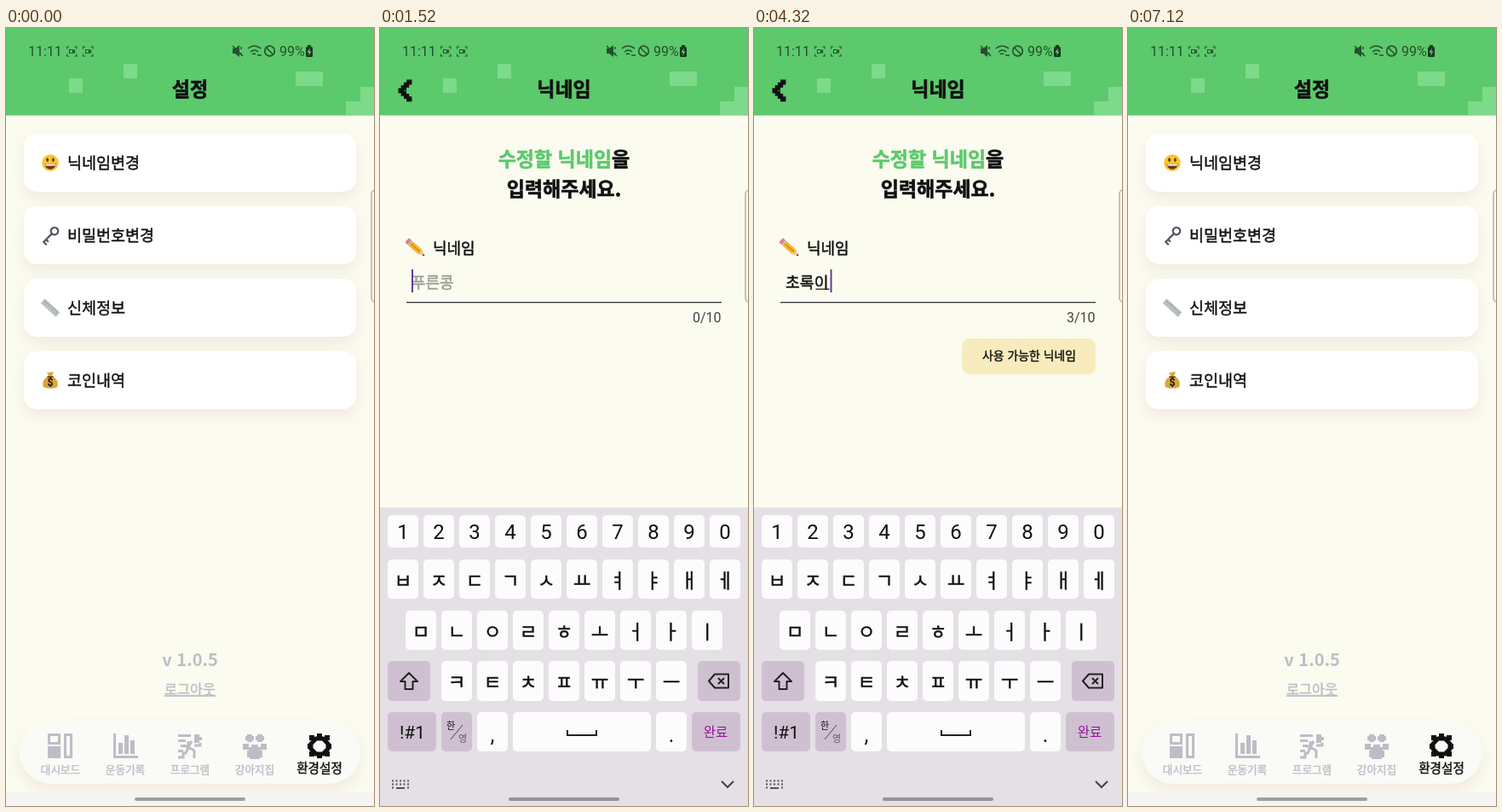
Recreate the animation shown at these times as an HTML page. Size 432 by 912 pixels, loop 7.36 s.

```html
<!DOCTYPE html>
<html lang="ko">
<head>
<meta charset="utf-8">
<style>
html, body { margin: 0; width: 100%; height: 100%; overflow: hidden; background: #fcfbef; }
svg { display: block; width: 432px; height: 912px; }
text { font-family: 'Noto Sans CJK KR', 'Noto Sans CJK', 'Noto Sans KR', sans-serif; color: #111; }
text, tspan { fill: currentColor; }
.latin { font-family: Roboto, sans-serif; }
.mid { text-anchor: middle; }
.end { text-anchor: end; }
.heavy, .heavy tspan { font-weight: 900; stroke: currentColor; stroke-width: .6px; }
.medium { font-weight: 500; stroke: currentColor; stroke-width: .4px; }
.card { filter: drop-shadow(0 8px 8px rgba(110, 70, 80, .09)); }
.raised { filter: drop-shadow(0 2px 2px rgba(0, 0, 0, .3)); }
.floating { filter: drop-shadow(0 1px 3px rgba(0, 0, 0, .28)); }
.line { fill: none; stroke: currentColor; }
</style>
</head>
<body>
<svg id="stage" viewBox="0 0 432 912"></svg>
<script>
const LOOP = 7360;
const INK = '#222', CREAM = '#fcfbef', GREEN = '#5cc96c', MUTED = '#bcbdc7';
const KEY = '#fcfcfc', DARK_KEY = '#cfc0d1';

// SVG building helpers
const rect = (x, y, w, h, fill, r = 0, extra = '') =>
  `<rect x="${x}" y="${y}" width="${w}" height="${h}" rx="${r}" fill="${fill}" ${extra}/>`;
const text = (x, y, size, str, cls = '', style = '') =>
  `<text x="${x}" y="${y}" font-size="${size}" class="${cls}" style="${style}">${str}</text>`;
const path = (d, color, width = 1.5, extra = '') =>
  `<path d="${d}" class="line" style="color:${color}" stroke-width="${width}" ${extra}/>`;
const shape = (d, fill) => `<path d="${d}" fill="${fill}"/>`;
const at = (x, y, content) => `<g transform="translate(${x} ${y})">${content}</g>`;

const header = title =>
  rect(0, 0, 432, 102.5, GREEN) +
  shape('M74 59h16v17h-16zM138 42h16v17h-16zM340 51h32v17h-32zM416 69h16v33h-33v-16h17z', '#7dda8a') +
  text(216, 80, 23, title, 'mid heavy');

// Small pictures, each centred on its own origin
const smiley = `<circle r="9.8" fill="#fbc52d"/><ellipse cx="-3.4" cy="-3.4" rx="1.4" ry="2.3" fill="#5b3a12"/>
  <ellipse cx="3.4" cy="-3.4" rx="1.4" ry="2.3" fill="#5b3a12"/>
  ${shape('M-6.5 1.2h13a6.5 6.5 0 0 1-13 0z', '#6b3813')}${shape('M-5.8 1.5h11.6v2h-11.6z', '#fff')}`;
const oldKey = `<g transform="rotate(-45)"><circle cx="7" r="4.2" class="line" style="color:#555560" stroke-width="2.4"/>
  ${path('M3 0H-12M-11 0v5M-7 0v4', '#555560', 2.2)}</g>`;
const ruler = `<g transform="rotate(42)">${rect(-12, -3.5, 24, 7, '#b9c0c2')}
  ${path('M-9-3v3M-6-3v2M-3-3v3M0-3v2M3-3v3M6-3v2M9-3v3', '#7f888b', .8)}</g>`;
const moneyBag = shape('M-4-9l8-1-2 5c6 3 8 8 6 13q-8 3-16 0c-2-5 0-10 6-13z', '#d9a63c') +
  path('M-3.5-4h7', '#7a5420', 2) + text(0, 6.5, 12, '$', 'latin mid', 'font-weight:700');
const pencil = `<g transform="rotate(42)">${rect(-8, -3.5, 15, 7, '#f5b82e')}${rect(-8, -.8, 15, 1.6, '#d98a1d')}
  ${rect(-11, -3.5, 3, 7, '#b8c0c6')}${rect(-14, -3.5, 4, 7, '#e8798c', 1.5)}
  ${shape('M7-3.5L14 0 7 3.5z', '#ecc79b')}${shape('M11.5-1.3L14 0l-2.5 1.3z', '#333')}</g>`;

const card = ([icon, label], i) => {
  const y = 124 + i * 85;
  return rect(21, y, 390, 68, '#fff', 15, 'class="card"') + at(52, y + 34, icon) +
    text(72, y + 40.5, 18.5, label, 'medium');
};

const tabIcons = [
  path('M50.5 828.5h12v10h-12zM69.5 828.5h7v26h-7z', MUTED, 3) + shape('M49 842h15v14h-15z', MUTED),
  shape('M126 827h3v26h26v3h-29zM132 838h5v13h-5zM139 829h5v22h-5zM146 835h5v16h-5z', MUTED),
  shape('M202 828h15v3h-15zM221 828h6v3h3v4h-3v3h-6zM202 834h9v3h-9zM205 840h6v3h-6zM202 846h6v3h-6z', MUTED) +
    path('M214 836v6h-5M218 836l-4 7 7 4v9M214 843l-3 7h-3v5h-6M221 841h7v-3', MUTED, 3),
  shape('M283 828h6v9h-6zM281 830h10v5h-10zM295 828h6v9h-6zM293 830h10v5h-10zM278 839h7v7h-7zM299 839h7v7h-7zM288 840h8v3h3v4h2v8h-3v2h-12v-2h-3v-8h2v-4h3z', MUTED),
  path('M364 833h8l6 6v6l-6 6h-8l-6-6v-6z', '#111', 5) +
    shape('M365 827h6v5h-6zM365 851h6v5h-6zM354 839h5v6h-5zM377 839h5v6h-5zM356 829h6v6h-6zM374 829h6v6h-6zM356 848h6v6h-6zM374 848h6v6h-6z', '#111'),
];
const tabs = ['대시보드', '운동기록', '프로그램', '강아지집', '환경설정'].map((label, i) =>
  tabIcons[i] + (i < 4
    ? text(64 + i * 76, 873.5, 12.6, label, 'mid medium', `color:${MUTED}`)
    : text(368, 873, 14.6, label, 'mid medium'))).join('');

const settingsPage = rect(0, 0, 432, 912, CREAM) + header('설정') +
  [[smiley, '닉네임변경'], [oldKey, '비밀번호변경'], [ruler, '신체정보'], [moneyBag, '코인내역']].map(card).join('') +
  text(216, 748, 20, 'v 1.0.5', 'mid', `font-weight:700;color:${MUTED}`) +
  text(216, 781, 16.3, '로그아웃', 'mid medium', `color:${MUTED};text-decoration:underline`) +
  rect(16, 812, 400, 74, '#fafaf6', 37, 'class="card"') + tabs;

const backArrow = [0, 1, 2, 3, 4, 5, 6].map(i =>
  rect(21.5 + Math.abs(i - 3) * 3.2, 60.5 + i * 3.3, 6.3, 6, '#111')).join('');

const formPage = rect(0, 0, 432, 912, CREAM) + header('닉네임') + backArrow +
  `<text x="216" y="162" font-size="23" class="mid heavy"><tspan style="color:${GREEN}">수정할 닉네임</tspan>을</text>` +
  text(216, 197, 23, '입력해주세요.', 'mid heavy') +
  at(42, 258, pencil) + text(62, 264.5, 18, '닉네임', 'medium') +
  '<g id="field"></g>' +
  rect(26, 823, 380, 53, '#74c88b', 9, 'class="raised"') +
  '<g id="submitRipple"></g>' + text(216, 855.5, 18.2, '수정 완료', 'mid medium');

// Keyboard geometry
const keyRows = [
  ['1234567890', 9, 571, 38], ['ㅂㅈㄷㄱㅅㅛㅕㅑㅐㅔ', 9, 623, 46],
  ['ㅁㄴㅇㄹㅎㅗㅓㅏㅣ', 30, 683, 46], ['ㅋㅌㅊㅍㅠㅜㅡ', 72, 742, 47],
];
const keyAt = {};
const plainKeys = keyRows.map(([chars, x0, y, h], row) => [...chars].map((char, i) => {
  const x = x0 + i * 42;
  keyAt[char] = { x: x + 18, y };
  return rect(x, y, 36, h, KEY, 5) +
    (row ? text(x + 18, y + h / 2 + 9.5, 22.5, char, 'mid medium') : text(x + 18, y + 28, 24, char, 'latin mid'));
}).join('')).join('');

const keyboard = rect(0, 562, 432, 350, '#e5dfe6') + plainKeys +
  rect(9, 742, 50, 47, DARK_KEY, 5) + rect(373, 742, 50, 47, DARK_KEY, 5) +
  path('M34 756l10 10h-5.5v9h-9v-9h-5.5z', INK, 2, 'stroke-linejoin="round"') +
  path('M386 765.5l7-8h16v16h-16zM397 762l7 7M404 762l-7 7', INK, 2, 'stroke-linejoin="round"') +
  [[9, 57, DARK_KEY], [72, 36, DARK_KEY], [114, 36, KEY], [156, 162, KEY], [324, 36, KEY], [366, 57, DARK_KEY]]
    .map(([x, w, fill]) => rect(x, 802, w, 46, fill, 5)).join('') +
  text(38, 833, 21, '!#1', 'latin mid') + text(83, 822, 11, '한', 'mid') +
  text(97, 837, 11, '영', 'mid', 'opacity:.6') + path('M83 834l14-17', '#444', 1) +
  text(132, 837, 25, ',', 'latin mid') + text(342, 837, 25, '.', 'latin mid') +
  path('M220 823v6h34v-6', INK, 2) +
  text(394, 831, 15.5, '완료', 'mid', 'color:#94149a');

const keyboardTools = path('M14 882.5h20M14 886.5h20M14 890.5h2M32 890.5h2', '#555', 2, 'stroke-dasharray="2 2.5"') +
  path('M19 891h10', '#555', 2) + path('M401 883l7 7 7-7', '#444', 2);

const STATUS = '#24512e';
const screenshotIcon = x => at(x, 21.5,
  path('M.5 3V.5H3M9.500.5H12V3M12 9v2.500H9.500M3 11.500H.5V9M3.500 4h4v4h-4zM7.500 6l2-1.500v3z', STATUS, 1.1));
const statusBar = text(26, 32.5, 16, '11:11', 'latin', `color:${STATUS}`) +
  screenshotIcon(71) + screenshotIcon(90) +
  shape('M266 24h3l5-4v14l-5-4h-3z', STATUS) + path('M266 21l12 12M276 22v3M276 29v2', STATUS, 1.5) +
  path('M284 24q7-6 15 0M287 28q5-4 9 0M289 31q2-2 4 0M295 32h5', STATUS, 1.6) +
  `<circle cx="309.5" cy="27" r="5.8" class="line" style="color:${STATUS}" stroke-width="1.7"/>` +
  path('M305.5 23l8 8', STATUS, 1.6) +
  text(321, 32.5, 16, '99%', 'latin', `color:${STATUS}`) +
  rect(352, 22, 8, 12, '#153a1d', 1.5) + rect(354, 20, 4, 3, '#153a1d') +
  shape('M357 23.5l-3.5 5h2.5l-1 4 3.5-5H356z', '#7dda8a') +
  path('M433 190q-4 0-4 5v121q0 5 4 5', '#8b8b84', 1);

document.getElementById('stage').innerHTML = `
  <defs><clipPath id="submitClip">${rect(26, 823, 380, 53, '#000', 9)}</clipPath>
  <clipPath id="checkClip">${rect(244, 364, 157, 42, '#000', 9)}</clipPath>
  <radialGradient id="splash"><stop offset=".7" stop-color="#6750a4"/>
  <stop offset="1" stop-color="#6750a4" stop-opacity="0"/></radialGradient></defs>
  ${settingsPage}<g id="form">${formPage}</g>${rect(0, 896, 432, 16, '#f4f4f4')}
  <g id="keyboard">${keyboard}</g><g id="tools">${keyboardTools}</g>
  ${rect(151, 902, 130, 4, '#000', 2, 'opacity=".35"')}<g id="popup"></g><g id="touches"></g>${statusBar}`;

const [form, field, submitRipple, keyboardLayer, tools, popup, touchLayer] =
  ['form', 'field', 'submitRipple', 'keyboard', 'tools', 'popup', 'touches'].map(id => document.getElementById(id));

// Timeline
const strokes = [
  [2080, 'ㅊ', 'ㅊ'], [2320, 'ㅗ', '초'], [2500, 'ㄹ', '촐'], [2680, 'ㅗ', '초로'],
  [2860, 'ㄱ', '초록'], [3040, 'ㅇ', '초록ㅇ'], [3220, 'ㅣ', '초록이'],
].map(([time, key, value]) => ({ time, key, value }));
const FOCUS = 1120, CHECKED = 4200, DONE = 5400;

const touches = [
  [80, 200, 250, 160], [960, 1040, 247, 300], [3920, 4040, 335, 387],
  [5280, 5440, 403, 831], [6080, 6260, 325, 852],
  ...strokes.map(s => [s.time, s.time + 100, keyAt[s.key].x + 7, keyAt[s.key].y + 35]),
];

const clamp = v => Math.min(1, Math.max(0, v));
const progress = (t, start, end) => clamp((t - start) / (end - start));
const easeOut = p => 1 - (1 - p) ** 3;
const easeInOut = p => p * p * (3 - 2 * p);

function ripple(t, start, x, y, reach, clip) {
  const grow = progress(t, start, start + 300);
  const alpha = .12 * grow ** .3 * (1 - progress(t, start + 250, start + 500));
  return alpha > 0
    ? `<g clip-path="url(#${clip})"><circle cx="${x}" cy="${y}" r="${30 + reach * grow}" fill="url(#splash)" opacity="${alpha}"/></g>` : '';
}

function drawField(t) {
  const last = strokes.filter(s => s.time <= t).pop();
  const value = last ? last.value : '';
  const count = value.length;
  const focused = t >= FOCUS && t < DONE;
  const invalid = count === 1;
  const accent = invalid ? '#9b2020' : '#5f3b96';
  const cursorX = 37 + 17.5 * count;
  let out = count ? text(37, 305, 18.3, value, 'medium')
    : text(37, 304.5, 18, '푸른콩', 'medium', 'color:#9a9a95');
  if (focused) {
    if (count) out += rect(cursorX - 17, 305.5, 16, 1.3, INK);
    const idle = t - (last ? last.time : FOCUS);
    if (idle % 1000 < 500) out += rect(cursorX, 283, 2, 27, accent);
  }
  const lineColor = invalid ? accent : t >= FOCUS && t < 5600 ? '#333' : '#888';
  out += rect(31, 321, 370, invalid ? 2 : 1.3, lineColor);
  out += text(400.5, 345, 16, `${count}/10`, 'latin end', 'color:#444');
  if (invalid) out += text(37, 345, 14.4, '2자 이상 10자 이하', 'medium', `color:${accent}`);
  if (count > 1) {
    const checked = t >= CHECKED;
    const width = checked ? 157 : 141;
    out += rect(401 - width, 364, width, 42, '#fff3bf', 9) + ripple(t, 3920, 335, 387, 130, 'checkClip') +
      text(401 - width / 2 + .5, 389, 13.9, checked ? '사용 가능한 닉네임' : '닉네임 중복검사', 'mid medium');
  }
  field.innerHTML = out;
}

function drawPopup(t) {
  const stroke = strokes.find(s => t >= s.time && t < s.time + 150);
  if (!stroke) return popup.innerHTML = '';
  const { x, y } = keyAt[stroke.key];
  popup.innerHTML = rect(x - 32, y - 93, 65, 84, KEY, 8, 'class="floating"') +
    text(x, y - 34, 36, stroke.key, 'mid medium');
}

function drawTouches(t) {
  touchLayer.innerHTML = touches.map(([down, up, x, y]) => {
    const alpha = t < down ? 0 : 1 - progress(t, up, up + 200);
    return alpha ? `<circle cx="${x}" cy="${y}" r="11.5" fill="#fff" fill-opacity=".5"
      stroke="#99959f" stroke-opacity=".4" stroke-width="1.5" opacity="${alpha}"/>` : '';
  }).join('');
}

function render(t) {
  const slide = 1 - easeOut(progress(t, 240, 560)) + easeInOut(progress(t, 6600, 6960));
  form.setAttribute('transform', `translate(${432 * slide} 0)`);
  form.style.display = slide < 1 ? '' : 'none';
  const lowered = 1 - easeOut(progress(t, FOCUS, 1380)) + easeInOut(progress(t, 5440, 5760));
  keyboardLayer.setAttribute('transform', `translate(0 ${350 * lowered})`);
  tools.style.display = t >= FOCUS && t < DONE ? '' : 'none';
  drawField(t);
  submitRipple.innerHTML = ripple(t, 6080, 325, 852, 340, 'submitClip');
  drawPopup(t);
  drawTouches(t);
}

const started = performance.now();
(function tick() {
  render((performance.now() - started) % LOOP);
  requestAnimationFrame(tick);
})();
</script>
</body>
</html>
```
